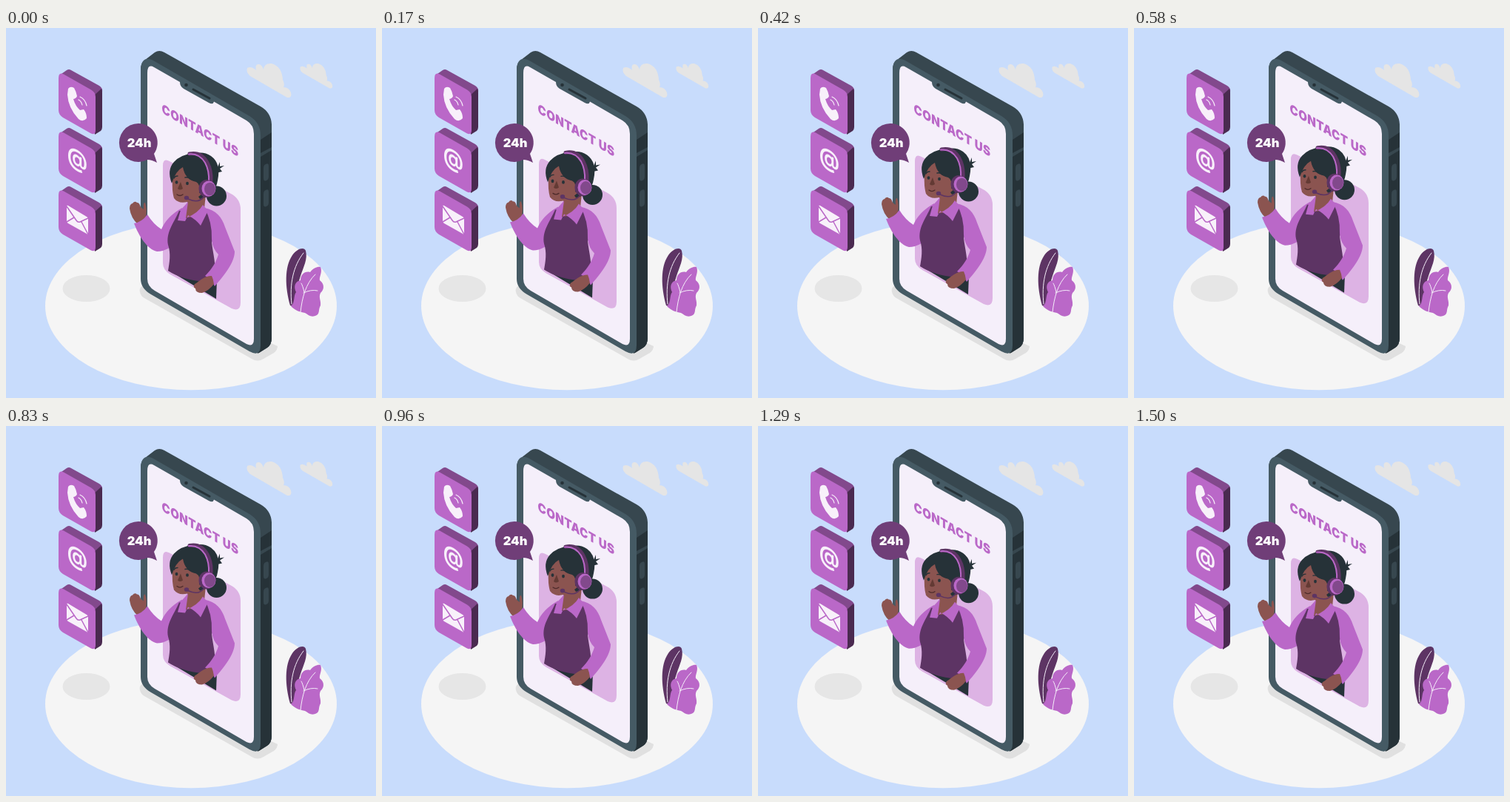
An HTML page that plays this animation: 500 by 500 pixels, repeating every 1.54 s.

```html
<!DOCTYPE html>
<html lang="en">
<head>
<meta charset="utf-8">
<title>Contact us</title>
<style>
  html, body { margin: 0; width: 100%; height: 100%; overflow: hidden; background: #c8dcfc; }
  svg { display: block; width: 100%; height: 100%; }
  text { font-family: Inter, sans-serif; font-weight: 900; }
  .light { fill: #ba68c8; }
  .mid { fill: #82498c; }
  .deep { fill: #5d3464; }
  .dark { fill: #263238; }
  .slate { fill: #37474f; }
  .skin { fill: #8b5450; }
  .white { fill: #f8f0fa; }
  .line { fill: none; stroke-linecap: round; stroke-linejoin: round; }
</style>
</head>
<body>
<svg viewBox="0 0 500 500">
  <defs>
    <g id="tile">
      <path class="mid" d="M72 64L82 57Q85 55 88 57L126 78Q131 81 130 87L120 95Z"/>
      <path fill="#4a2a50" d="M118 92L129 82Q130 84 130 88V134Q130 137 128 139L120 144Z"/>
      <path class="light" d="M71 68Q71 59 78 62.500L115 83.500Q121 87 121 93V138Q121 146 114 142L77 121Q71 117 71 111Z"/>
    </g>
    <path id="cloud" fill="#e5e5e5" d="M326 54Q331 51 338 57Q336 48 342 49Q346 50 348 56Q349 47 359 48Q373 52 374 70Q377 76 375 80Q382 80 385 87Q387 95 380 94L330 65Q324 60 326 54Z"/>
  </defs>

  <!-- floor and clouds -->
  <ellipse cx="250" cy="375.500" rx="197" ry="113.700" fill="#f5f5f5"/>
  <ellipse cx="108.500" cy="352" rx="32" ry="18" fill="#e6e6e6"/>
  <path fill="#e0e0e0" d="M181 357Q179 350 188 346L367 430Q367 435 362 439L348 447Q340 452 332 447L187 365Q182 362 181 357Z"/>
  <use href="#cloud"/>
  <use href="#cloud" transform="translate(159.800 13) scale(.73)"/>

  <!-- phone -->
  <path class="slate" d="M182 56Q182 47 188 43L201 33Q207 29 214 33L344 106Q358 114 359 130V419Q359 428 353 432L342 439L196 356Z"/>
  <path class="dark" d="M344 151L359 141V419Q359 428 353 432L340 440Z"/>
  <path class="slate" d="M344 169L359 161V165L344 174Z"/>
  <path class="slate" d="M348 189Q348 185 351 184Q355 182 355 186V201Q355 205 352 206Q348 208 348 203ZM348 224Q348 220 351 219Q355 217 355 221V236Q355 240 352 241Q348 243 348 238Z"/>
  <path fill="#455a64" d="M182 57C182 43 189 38 200 44.500L329 119Q344 128 344 145V429Q344 445 329 437L196 360Q182 352 182 339Z"/>
  <path fill="#f5effa" d="M191 61Q191 48 200 53L235 73Q235 79 240 82L274 101Q280 104 281 99.500L325 125Q335 131 335 143V420Q335 432 325 427L201 355Q191 349 191 339Z"/>
  <circle class="dark" cx="243.500" cy="77" r="2.300"/>
  <path class="line" stroke="#263238" stroke-width="3" d="M253 83L275 95"/>
  <text class="light" font-size="17.400" letter-spacing=".45" transform="matrix(.866 .5 0 1 210.500 114.500)">CONTACT US</text>

  <!-- operator -->
  <g id="operator">
    <path fill="#ddb3e4" d="M212 186Q212 175 221 180L304 224Q317 231 317 245V371Q317 384 305 379L222 333Q212 327 212 318Z"/>
    <path class="dark" d="M219 327L284 366L285 340L262 326Z"/>
    <!-- raised arm -->
    <path class="skin" d="M167 244Q167 238 171 237Q174 233 177 236Q180 235 182 242L186 245Q185 235 188 236Q191 244 189 255L178 265Q169 257 167 244Z"/>
    <path class="light" d="M173 264Q184 262 191 252Q199 265 210 272Q217 255 238 243L234 285Q220 302 204 302C191 299 180 282 173 264Z"/>
    <!-- torso -->
    <path class="deep" d="M234 247C226 265 216 276 219 293C223 305 221 317 219 328Q237 340 268 343L282 334C284 320 280 306 278 290L284 268L271 246Z"/>
    <path class="light" d="M268 243C284 246 292 256 296 269L309 302C309 317 295 334 282 349Q277 338 269 335C279 325 284 316 287 306Q279 298 278 286Q279 262 268 243Z"/>
    <path class="skin" d="M278 335C267 335 262 342 255 346Q252 350 256 352Q256 358 265 358Q274 355 281 346Q280 339 278 335Z"/>
    <path class="skin" d="M246 229L270 225L268 244Q258 258 242 256Z"/>
    <path class="light" d="M246 235L236 246L232 260L242 261L246 253Q257 259 263 267L273 247L266 239Q260 250 243 257Z"/>
    <!-- head -->
    <circle class="dark" cx="284.500" cy="227" r="13.500"/>
    <path class="dark" d="M280 183L286 188L289 181L289 187L295 186L289 190L292 194L279 197Z"/>
    <path class="dark" d="M240 178Q260 162 277 173Q291 183 286 206Q283 226 262 231L245 205Z"/>
    <path class="skin" d="M238 180Q226 188 225 204Q224 220 227 230Q233 238 245 235Q260 231 267 221L263 194Z"/>
    <path class="dark" d="M224 210Q217 192 227 181Q236 171 254 169L280 186L277 218L261 223Q263 211 257 208Q242 205 239 188Q229 193 224 210Z"/>
    <g class="dark">
      <ellipse cx="230.500" cy="208.500" rx="1.900" ry="2.300"/>
      <ellipse cx="245" cy="210" rx="1.900" ry="2.300"/>
    </g>
    <path class="line" stroke="#263238" stroke-width="1.400" d="M227 203Q228 200 232 200M242 202Q246 201 249 204"/>
    <path fill="#633a34" d="M236 208L232 217Q235 220 239 217Z"/>
    <path class="line" stroke="#4e2b2b" stroke-width="1.300" d="M231 225Q235 228 239 225"/>
    <!-- headset -->
    <path class="line" stroke="#5d3464" stroke-width="5" d="M248 170Q264 167 272 182Q278 193 277 208"/>
    <path class="line" stroke="#ba68c8" stroke-width="2" d="M247 170.500Q261 169 269 182Q275 193 274 208"/>
    <ellipse class="deep" cx="271" cy="217" rx="10.500" ry="12"/>
    <ellipse class="light" cx="274" cy="217" rx="9.500" ry="10.500"/>
    <ellipse class="mid" cx="275.500" cy="217.500" rx="7.500" ry="8.800"/>
    <path class="line" stroke="#5d3464" stroke-width="1.500" d="M268 227Q261 238 246 231"/>
    <ellipse class="deep" cx="244" cy="229.500" rx="3.200" ry="2.800"/>
  </g>

  <!-- speech bubble -->
  <path fill="#703e78" d="M179 129A26 26 0 0 1 200 170L204 182Q197 178 191 178A26 26 0 1 1 179 129Z"/>
  <text x="180" y="161" font-size="16.500" text-anchor="middle" fill="#fff">24h</text>

  <!-- contact tiles -->
  <use href="#tile"/>
  <use href="#tile" y="79"/>
  <use href="#tile" y="158"/>
  <path class="white" d="M84 82Q87 78 92 81Q95 86 96 92Q95 95 91 96Q94 106 100 111L105 110Q109 115 109 122Q104 128 98 123Q84 108 83 90Z"/>
  <path class="line" stroke="#f8f0fa" stroke-width="1.200" d="M98 97Q102 99 103 104M100 93Q107 96 109 105"/>
  <text class="white" font-size="31" text-anchor="middle" style="font-weight:700" transform="matrix(.866 .5 0 1 96.500 187)">@</text>
  <path class="white" d="M82 241Q82 239 84 240L109 255Q111 256 111 258V277Q111 280 109 278L84 264Q82 263 82 261Z"/>
  <path class="line" stroke="#ba68c8" stroke-width="1.500" d="M82 241L95 260Q97 263 100 262L111 257M82 262L92 256M111 279L102 262"/>

  <!-- plant -->
  <path class="deep" d="M384 375C377 350 376 323 387 307C393 298 403 295 405 301C408 312 402 323 398 335Q392 351 392 377Z"/>
  <path class="line" stroke="#f5effa" stroke-width="1" d="M386 373C383 346 388 322 402 304"/>
  <path class="light" d="M385 376C391 371 388 362 392 357C388 349 391 342 398 341C398 333 404 328 411 330C415 324 422 322 425 323C428 330 423 336 424 341C431 346 430 354 425 358C422 364 426 368 425 375C422 380 424 386 420 388C413 392 409 388 404 385C398 384 391 382 385 376Z"/>
  <path class="line" stroke="#f5effa" stroke-width="1" d="M398 384C400 365 405 345 418 333M403 357Q401 348 399 345M402 358Q412 353 421 355"/>
</svg>
<script>
  const LOOP = 1540, LOWEST = 1490, SWING = 4.5;
  const operator = document.getElementById('operator');
  const wave = t => SWING * Math.cos(2 * Math.PI * (t - LOWEST) / LOOP);
  const start = performance.now();

  function draw(now) {
    const t = Math.max(0, now - start) % LOOP;
    operator.setAttribute('transform', `translate(0 ${(wave(t) - wave(0)).toFixed(2)})`);
    requestAnimationFrame(draw);
  }
  draw(start);
</script>
</body>
</html>
```
